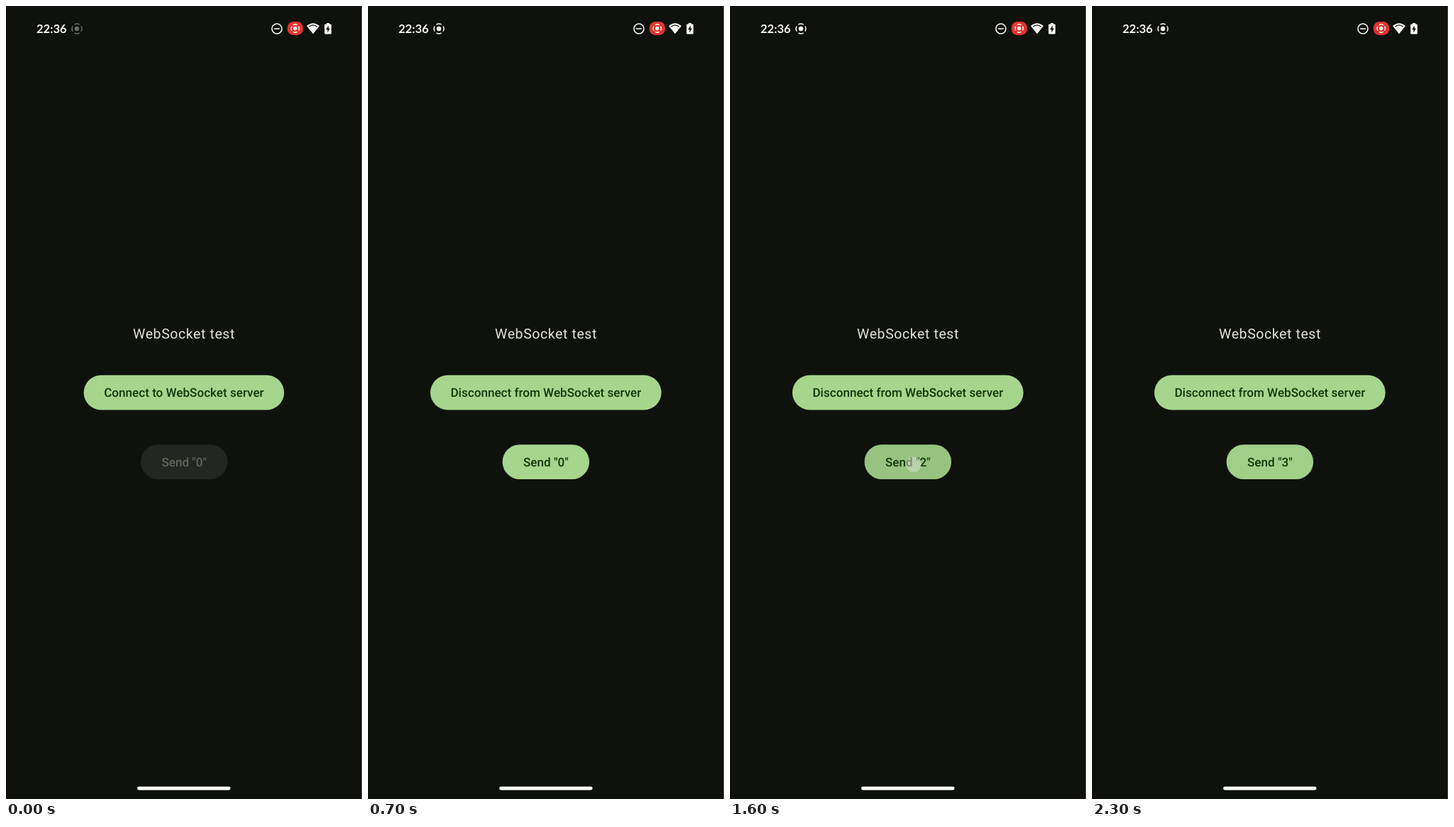
These frames come from a looping animation (502 by 1116 pixels, 2400 ms). An HTML page with a canvas:

```html
<!DOCTYPE html>
<html lang="en">
<head>
<meta charset="utf-8">
<title>WebSocket test</title>
<style>
html, body { margin: 0; width: 100%; height: 100%; overflow: hidden; background: #0f110d; }
canvas { display: block; width: 502px; height: 1116px; }
</style>
</head>
<body>
<canvas id="stage" width="502" height="1116"></canvas>
<script>
const ctx = document.getElementById('stage').getContext('2d');
const LOOP = 2400, STEP = 100, DP = 1.22, TAU = Math.PI * 2;
const BG = '#0f110d', GREEN = '#a6d58d', INK = '#12380a', WHITE = '#fafaf7';

// Each step of a tap: [ripple alpha, ripple spread, touch dot alpha]
const TAP = [[.1, .45, .55], [.1, 1, .5], [.075, 1, 0], [.035, 1, 0]];
const QUICK = [[.1, 1, .5], [.035, 1, 0]];
const FADED = [[.1, .45, .5], [.1, 1, .25], [.075, 1, 0], [.035, 1, 0]];
const taps = [
  { at: 300, target: 'connect', x: 270, y: 541, steps: FADED },
  { at: 900, target: 'send', x: 259, y: 645, steps: TAP },
  { at: 1500, target: 'send', x: 259, y: 645, steps: TAP },
  { at: 2200, target: 'send', x: 259, y: 645, steps: QUICK }
];

function disc(x, y, r, color) {
  ctx.fillStyle = color;
  ctx.beginPath();
  ctx.arc(x, y, r, 0, TAU);
  ctx.fill();
}

function pill(x, y, w, h, color, r = h / 2) {
  ctx.fillStyle = color;
  ctx.beginPath();
  ctx.roundRect(x, y, w, h, r);
  ctx.fill();
}

function poly(points, color) {
  ctx.fillStyle = color;
  ctx.beginPath();
  points.forEach(([x, y]) => ctx.lineTo(x, y));
  ctx.fill();
}

function label(text, x, y, font, color, spacing = 0, align = 'left') {
  ctx.font = font;
  ctx.textRendering = 'geometricPrecision';
  ctx.letterSpacing = spacing + 'px';
  ctx.textAlign = align;
  ctx.fillStyle = color;
  ctx.fillText(text, x, y);
}

function recordIcon(x, y, r, dot, color) {
  disc(x, y, dot, color);
  ctx.strokeStyle = color;
  ctx.lineWidth = 1.5;
  for (let i = 0; i < 4; i++) {
    const mid = i * TAU / 4;
    ctx.beginPath();
    ctx.arc(x, y, r, mid - .55, mid + .55);
    ctx.stroke();
  }
}

function wifiIcon() {
  ctx.fillStyle = WHITE;
  ctx.beginPath();
  ctx.moveTo(433, 39.2);
  ctx.lineTo(424, 28);
  ctx.quadraticCurveTo(433, 20.4, 442, 28);
  ctx.fill();
  ctx.strokeStyle = BG;
  ctx.lineWidth = 1.3;
  ctx.beginPath();
  ctx.moveTo(427.3, 29.3);
  ctx.quadraticCurveTo(433, 24.6, 438.7, 29.3);
  ctx.stroke();
}

function statusBar(t) {
  label('22:36', 43, 37.6, '700 16.5px Lato, sans-serif', WHITE);
  recordIcon(100, 32, 6.9, 3.2, t < 100 ? '#6b6d68' : WHITE);

  ctx.strokeStyle = WHITE;
  ctx.lineWidth = 1.6;
  ctx.beginPath();
  ctx.arc(382, 32, 7, 0, TAU);
  ctx.stroke();
  ctx.fillStyle = WHITE;
  ctx.fillRect(378.2, 31.2, 7.6, 1.6);

  pill(396.8, 22, 22.2, 19, '#e0352f', 8.5);
  recordIcon(407.8, 31.5, 5.6, 2.7, WHITE);
  wifiIcon();

  ctx.fillStyle = WHITE;
  ctx.beginPath();
  ctx.roundRect(449.2, 25.4, 9.6, 14, 1.2);
  ctx.rect(452, 24, 4, 2);
  ctx.fill();
  poly([[454.8, 27.6], [451.2, 33.2], [453.4, 33.2], [453.4, 37.4], [456.9, 31.6], [454.8, 31.6]], BG);
}

function button(text, x, y, w, enabled, press) {
  const h = 40 * DP;
  pill(x, y, w, h, enabled ? GREEN : '#242622');
  if (press) {
    const [alpha, spread] = press.step;
    ctx.save();
    ctx.beginPath();
    ctx.roundRect(x, y, w, h, h / 2);
    ctx.clip();
    ctx.globalAlpha = alpha;
    disc(press.x, press.y, w * spread, INK);
    ctx.restore();
  }
  label(text, x + w / 2, y + 30.3, '500 17.08px Roboto, sans-serif',
    enabled ? INK : '#62645e', 0, 'center');
}

function activeTap(t) {
  for (const tap of taps) {
    const step = tap.steps[Math.floor((t - tap.at) / STEP)];
    if (step) return { ...tap, step };
  }
  return null;
}

function draw(now) {
  const t = Math.floor(now % LOOP / STEP) * STEP;
  const tap = activeTap(t);
  const pressed = name => tap && tap.target === name ? tap : null;
  const online = t >= 400;
  const count = [1000, 1600, 2200].filter(at => t >= at).length;

  ctx.fillStyle = BG;
  ctx.fillRect(0, 0, 502, 1116);
  ctx.fillStyle = '#3a4b37';
  ctx.fillRect(501, 0, 1, 1116);
  statusBar(t);

  label('WebSocket test', 251, 467.7, '400 19.52px Roboto, sans-serif', '#e2e3da', .58, 'center');
  if (online) button('Disconnect from WebSocket server', 87.9, 519.6, 325.8, true, pressed('connect'));
  else button('Connect to WebSocket server', 109.6, 519.6, 282.6, true, pressed('connect'));
  button(`Send "${count}"`, online ? 189.6 : 190, 617.2, 122.5, online, pressed('send'));

  if (tap && tap.step[2]) {
    ctx.globalAlpha = tap.step[2];
    disc(tap.x, tap.y, 10.8, '#d8e2d4');
    ctx.globalAlpha = 1;
  }
  pill(185, 1098.6, 131.6, 4.9, WHITE);
}

const start = performance.now();
function tick() {
  draw(performance.now() - start);
  requestAnimationFrame(tick);
}
tick();
</script>
</body>
</html>
```
